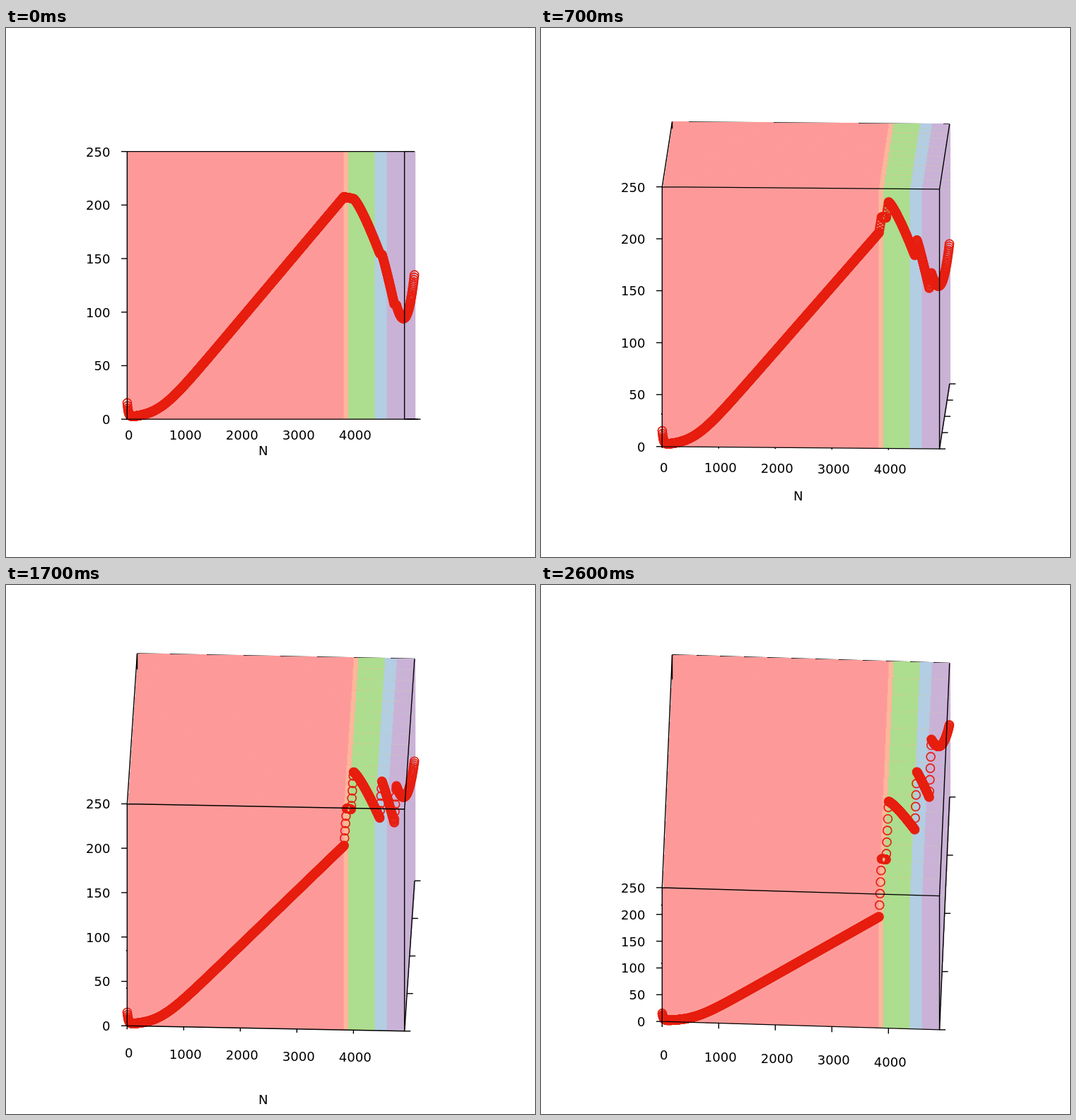
These frames come from a looping animation (748x748 px, 2700 ms). An HTML page with a canvas:

```html
<!DOCTYPE html>
<html lang="en">
<head>
<meta charset="utf-8">
<title>Rotating plot</title>
<style>
html, body { margin: 0; width: 100%; height: 100%; overflow: hidden; background: #fff; }
canvas { display: block; }
</style>
</head>
<body>
<canvas id="c" width="748" height="748"></canvas>
<script>
const ctx = document.getElementById('c').getContext('2d');
const LEFT = 171.3, WIDTH = 392.2, SKEW = 14.2;
const MID = 363.9, HALF = 189.25, NEAR = 183.2, YAW = 13.5, DEPTH = 380;
const STEPS = 14;

// Colour and left edge of each band on the front face
const bands = [
  ['#fd9a99', 172], ['#fdb79a', 477.5], ['#addd8e', 484], ['#b3cde3', 521.5], ['#cab2d6', 538.5]
];
const RIGHT = 579;

// Unrotated curve, one run per depth level; u runs from 0 to 1 along the run
const runs = [
  { from: 171.4, to: 478, y(x) {
    const rise = 18.75 * Math.log(1 + Math.exp((x - 214.6) / 15.8));
    const spike = 21 * Math.exp((LEFT - x) / 1.7);
    return 551.2 - rise - spike;
  } },
  { from: 481.5, to: 488, y: (x, u) => 239.7 + 1.2 * u * u },
  { from: 491.5, to: 528.5, y: (x, u) => 241.5 + 77.3 * u ** 1.25 },
  { from: 531.5, to: 549, y: (x, u) => 320.3 + 70 * u ** 1.1 },
  { from: 552, to: 577.5, y(x) {
    const v = x - 562;
    return 410.8 - v * v * (.216 + .0026 * v);
  } }
];

function buildPoints() {
  const pts = [];
  runs.forEach(({ from, to, y }, n) => {
    const d = n / 4, first = { x: from, y: y(from, 0) }, last = pts[pts.length - 1];
    // Sparse rings bridge one depth level to the next
    if (n) for (let f = n % 2 ? .2 : .1; f < .95; f += .2)
      pts.push({
        x: last.x + (first.x - last.x) * f,
        y: last.y + (first.y - last.y) * f,
        d: last.d + f / 4
      });
    const count = Math.round((to - from) / .4);
    for (let i = 0; i <= count; i++) {
      const u = i / count, x = from + (to - from) * u;
      pts.push({ x, y: y(x, u), d });
    }
  });
  return pts;
}
const points = buildPoints();

function line(...pts) {
  ctx.beginPath();
  pts.forEach(p => ctx.lineTo(...p));
  ctx.stroke();
}

function draw(angle) {
  const cos = Math.cos(angle), sin = Math.sin(angle);
  // Screen y for screen x, height h below the middle and depth d
  const project = (x, h, d) => {
    const u = (x - LEFT - SKEW * d) / WIDTH;
    return MID + h * cos + sin * (NEAR + YAW * u - DEPTH * d);
  };
  const corner = (u, h, d) => {
    const x = LEFT + WIDTH * u + SKEW * d;
    return [x, project(x, h, d)];
  };

  const flb = corner(0, HALF, 0), flt = corner(0, -HALF, 0);
  const frb = corner(1, HALF, 0), frt = corner(1, -HALF, 0);
  const blt = corner(0, -HALF, 1), brt = corner(1, -HALF, 1), brb = corner(1, HALF, 1);

  ctx.fillStyle = '#fff';
  ctx.fillRect(0, 0, 748, 748);
  ctx.strokeStyle = '#000';
  ctx.lineWidth = 1.5;
  line(blt, brt);
  for (const d of [.25, .5]) {
    const y = flb[1] - DEPTH * d * sin;
    line([169.7, y], [172, y]);
  }

  // Colour bands, clipped to the box outline with a stepped back edge
  ctx.save();
  ctx.beginPath();
  ctx.moveTo(...flb);
  ctx.lineTo(...flt);
  for (let x = 185; x < RIGHT; x++) {
    const y = Math.floor(project(x, -HALF, 1) + .15);
    ctx.lineTo(x, y);
    ctx.lineTo(x + 1, y);
  }
  ctx.lineTo(RIGHT, brb[1]);
  ctx.lineTo(...frb);
  ctx.clip();
  for (let i = STEPS; i >= 0; i--) {
    const lift = i === STEPS ? 3 : 0;
    for (const [color, edge] of bands) {
      const x = edge + i, d = i / STEPS;
      ctx.fillStyle = color;
      ctx.beginPath();
      ctx.moveTo(x, project(x, -HALF, d) - lift);
      ctx.lineTo(RIGHT, project(RIGHT, -HALF, d) - lift);
      ctx.lineTo(RIGHT, 748);
      ctx.lineTo(x, 748);
      ctx.fill();
    }
  }
  ctx.restore();

  ctx.strokeStyle = '#e71f10';
  ctx.lineWidth = 1.7;
  for (const p of points) {
    ctx.beginPath();
    ctx.arc(p.x, project(p.x, p.y - MID, p.d), 6, 0, 7);
    ctx.stroke();
  }

  ctx.strokeStyle = '#000';
  ctx.lineWidth = 1.4;
  line(blt, flt, flb, frb, frt, flt);
  line(frt, brt);
  line(frb, brb);
  line(blt, [blt[0], blt[1] + 40 * sin]);

  ctx.fillStyle = '#000';
  ctx.font = '18px "DejaVu Sans", Verdana, sans-serif';
  ctx.textAlign = 'right';
  for (let v = 0; v <= 250; v += 50) {
    const y = corner(0, HALF - 2 * HALF * v / 250, 0)[1];
    line([163, y], [LEFT, y]);
    ctx.fillText(v, 147.4, y + 7);
  }
  ctx.textAlign = 'center';
  for (let v = 0; v <= 4000; v += 1000) {
    const x = LEFT + v * .08, y = project(x, HALF, 0);
    line([x, y], [x, y + 9 * sin]);
    ctx.fillText(v, x + 2.4, y + 28.6 + 29.3 * sin);
  }
  ctx.fillText('N', 363.7, project(367, HALF, 0) + 50.4 + 101.5 * sin);
  for (let i = 0; i <= 4; i++) {
    const [x, y] = corner(1, HALF, i / 4);
    line([x, y], [x + 8.5, y]);
  }
}

// 2 degrees per step at first, then 3
const degrees = k => k <= 18 ? 2 * k : 3 * k - 18;

const start = performance.now();
let shown = -1;
function tick() {
  const k = Math.floor((performance.now() - start) % 2700 / 100);
  if (k !== shown) {
    shown = k;
    draw(degrees(k) * Math.PI / 180);
  }
  requestAnimationFrame(tick);
}
tick();
</script>
</body>
</html>
```
